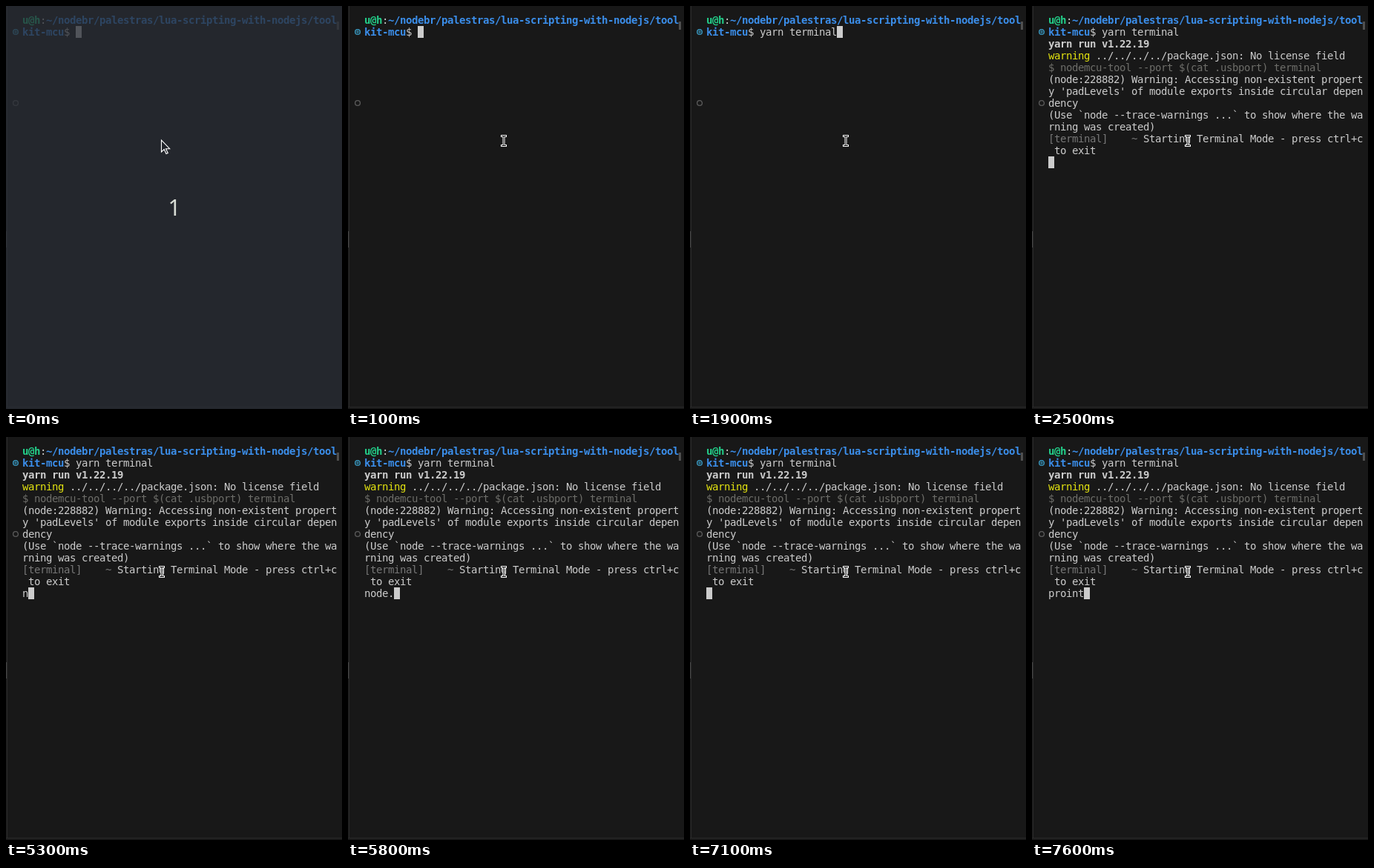
Recreate the animation shown at these times as an HTML page with a canvas. Size 453 by 544 pixels, loop 8 s.

```html
<!DOCTYPE html>
<html lang="en">
<head>
<meta charset="utf-8">
<title>Terminal session</title>
<style>
html, body { margin: 0; width: 100%; height: 100%; overflow: hidden; background: #181818; }
canvas { display: block; }
</style>
</head>
<body>
<canvas id="stage" width="453" height="544"></canvas>
<script>
const ctx = document.getElementById('stage').getContext('2d');
const LOOP = 8000, LEFT = 22, TOP = 11, CELL_W = 8, CELL_H = 16;
const FG = '#cccccc', GREEN = '#23d18b', BLUE = '#3b8eea', YELLOW = '#e5e510', DIM = '#6e6e6a';

// Each row is a list of [text, colour, bold] runs.
const prompt = [
  [['u@h', GREEN, true], [':', FG], ['~/nodebr/palestras/lua-scripting-with-nodejs/tool', BLUE, true]],
  [['kit-mcu', BLUE, true], ['$ ', FG]]
];
const output = [
  [['yarn run v1.22.19', FG, true]],
  [['warning', YELLOW], [' ../../../../package.json: No license field', FG]],
  [['$ nodemcu-tool --port $(cat .usbport) terminal', DIM]],
  [['(node:228882) Warning: Accessing non-existent propert', FG]],
  [["y 'padLevels' of module exports inside circular depen", FG]],
  [['dency', FG]],
  [['(Use `node --trace-warnings ...` to show where the wa', FG]],
  [['rning was created)', FG]],
  [['[terminal]    ~ ', '#777777'], ['Starting Terminal Mode - press ctrl+c', FG]],
  [[' to exit', FG]]
];

// [time, text] pairs: the last one reached is shown.
const command = [
  [0, ''], [500, 'y'], [600, 'ya'], [700, 'yar'], [900, 'yarn'], [1100, 'yarn '],
  [1200, 'yarn t'], [1300, 'yarn te'], [1500, 'yarn ter'], [1600, 'yarn term'],
  [1700, 'yarn termi'], [1800, 'yarn termin'], [1900, 'yarn terminal']
];
const input = [
  [0, ''], [5300, 'n'], [5400, 'no'], [5500, 'nod'], [5600, 'node'], [5800, 'node.'],
  [6500, 'node'], [6700, 'nod'], [6800, 'no'], [7100, ''], [7200, 'p'], [7300, 'pr'],
  [7400, 'pro'], [7500, 'proi'], [7600, 'proint']
];
const outputRows = [[0, 0], [2400, 3], [2500, output.length]];
const at = (steps, t) => steps.findLast(step => step[0] <= t)[1];

function rect(x, y, w, h, color) {
  ctx.fillStyle = color;
  ctx.fillRect(x, y, w, h);
}

function ring(y, radius, width, color) {
  ctx.beginPath();
  ctx.arc(13, y, radius, 0, 2 * Math.PI);
  ctx.lineWidth = width;
  ctx.strokeStyle = color;
  ctx.stroke();
}

// Draws the runs on the cell grid and returns the column after them.
function drawRow(runs, row) {
  let col = 0;
  for (const [text, color, bold] of runs) {
    ctx.font = `${bold ? 'bold ' : ''}14px "DejaVu Sans Mono", monospace`;
    ctx.fillStyle = color;
    for (const char of text) ctx.fillText(char, LEFT + CELL_W * col++, TOP + CELL_H * row + 13);
  }
  return col;
}

function drawTerminal(t) {
  rect(0, 0, 453, 544, '#181818');
  rect(1, 0, 1, 542, '#2b2b2b');
  rect(0, 541, 453, 1, '#2b2b2b');
  rect(0, 304, 1, 22, '#454545');
  rect(446, 21, 3, 11, '#4f4f4f');
  ring(35, 3.3, 1.5, '#3792b8');
  rect(12.5, 33, 1, 4, '#3792b8');
  rect(11, 34.5, 4, 1, '#3792b8');
  ring(131, 3.4, 1.3, '#5c5c5c');

  const entered = t >= 2200;
  const rows = [
    prompt[0],
    [...prompt[1], [at(command, t), FG]],
    ...output.slice(0, at(outputRows, t))
  ];
  if (entered) rows.push([[at(input, t), FG]]);
  let col = 0;
  rows.forEach((runs, row) => { col = drawRow(runs, row); });
  rect(LEFT + CELL_W * col, TOP + CELL_H * (rows.length - 1), CELL_W, CELL_H, FG);
}

function drawCountdown() {
  rect(0, 0, 453, 544, 'rgba(40, 44, 53, .75)');
  ctx.font = '30px "Noto Sans", sans-serif';
  ctx.textAlign = 'center';
  ctx.fillStyle = '#d9ded6';
  ctx.fillText('1', 227, 283);
  ctx.textAlign = 'left';
}

function drawArrow() {
  const arrow = new Path2D('M209.5 181v16l3.7-3.5 2.8 6 2.3-1-2.8-5.8h5.2z');
  ctx.fillStyle = '#202329';
  ctx.fill(arrow);
  ctx.lineWidth = 1.1;
  ctx.strokeStyle = '#ffffff';
  ctx.stroke(arrow);
}

function drawIBeam() {
  const beam = new Path2D('M207.5 175.5h5M210 175.5v13M207.5 188.5h5');
  ctx.lineCap = 'square';
  for (const [width, color] of [[3, '#ffffff'], [1, '#000000']]) {
    ctx.lineWidth = width;
    ctx.strokeStyle = color;
    ctx.stroke(beam);
  }
}

function frame() {
  const t = performance.now() % LOOP;
  drawTerminal(t);
  if (t < 100) {
    drawCountdown();
    drawArrow();
  } else {
    drawIBeam();
  }
  requestAnimationFrame(frame);
}
frame();
</script>
</body>
</html>
```
